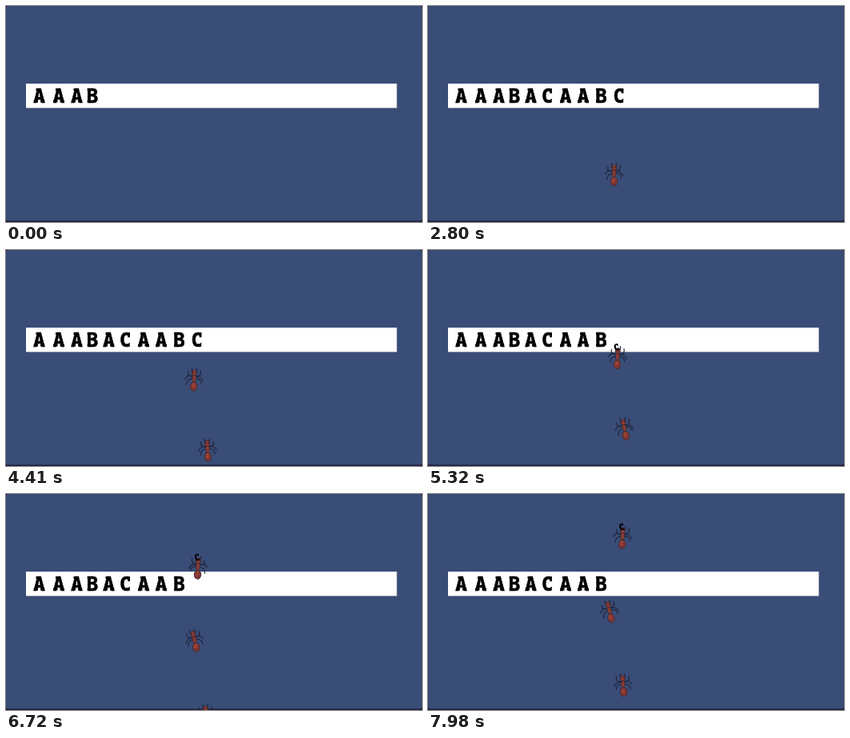
Animation of 520x270 px, one loop 8 s. Source, as an HTML page with a canvas:

```html
<!DOCTYPE html>
<html lang="en">
<head>
<meta charset="utf-8">
<title>Ants and letters</title>
<style>
  html, body { margin: 0; width: 100%; height: 100%; overflow: hidden; background: #394d77; }
  canvas { display: block; }
</style>
</head>
<body>
<canvas id="stage" width="520" height="270"></canvas>
<script>
const ctx = document.getElementById('stage').getContext('2d');
const LOOP = 8000, STEP = 70;
const TEXT = 'AAABACAABC';
const CENTERS = [41.5, 66, 88.5, 108, 128.5, 149, 172, 194, 216.5, 238.5];
const BASELINE = 120.5;
const INITIAL = 4, TYPE_START = 70, TYPE_EVERY = 410;
const PICKUP = 5250;

// Slab serifs as [x, y, width, height], relative to the middle of the baseline.
const SLABS = {
  A: [[-6.7, -3, 5.2, 3], [1.5, -3, 5.2, 3], [-4, -17.5, 6, 3]],
  B: [[-6.3, -3, 4, 3], [-6.3, -17.5, 4, 3]],
  C: [[3.2, -17.3, 2.6, 6]]
};

// Each path takes seconds since the ant's own reference time.
const ants = [
  { from: 1.33, carrier: true,
    x: s => 231 + 0.9 * s + 0.14 * s * s,
    y: s => 255 - 30.2 * s,
    tilt: s => 0.05 - 0.2 * Math.exp(-Math.max(s, 0)) },
  { from: 4.41,
    x: s => 252 - 7 * s,
    y: s => 250 - 28.9 * s,
    tilt: s => -0.23 + 0.18 * Math.exp(-2 * Math.max(s, 0)) },
  { from: 6.72,
    x: s => 250 - 4.8 * s,
    y: s => 277 - 30.2 * s,
    tilt: () => -0.08 }
];

function ellipse(x, y, rx, ry, fill) {
  ctx.beginPath();
  ctx.ellipse(x, y, rx, ry, 0, 0, Math.PI * 2);
  ctx.fillStyle = fill;
  ctx.fill();
}

function curve(x1, y1, bendX, bendY, x2, y2) {
  ctx.beginPath();
  ctx.moveTo(x1, y1);
  ctx.quadraticCurveTo(bendX, bendY, x2, y2);
  ctx.stroke();
}

function letter(char, x, y, scale = 1) {
  ctx.save();
  ctx.translate(x, y);
  ctx.scale(scale, scale);
  ctx.font = 'bold 24px "DejaVu Sans Mono", monospace';
  ctx.textAlign = 'center';
  ctx.fillStyle = ctx.strokeStyle = '#000';
  ctx.lineWidth = 0.6;
  ctx.fillText(char, 0, 0);
  ctx.strokeText(char, 0, 0);
  for (const slab of SLABS[char]) ctx.fillRect(...slab);
  ctx.restore();
}

function drawLegs(s) {
  ctx.strokeStyle = '#20233a';
  ctx.lineWidth = 1.1;
  for (const side of [-1, 1]) {
    const swing = side * Math.sin(s * 12);
    curve(side, -4, side * 10, -4 + swing, side * 7.5, -11 + swing);
    curve(side, -3, side * 8, -7 - swing, side * 11.5, 1 - swing);
    curve(side, -1, side * 9, -2 + swing, side * 9, 6 + swing);
    curve(side, -10, side * 5, -11, side * 2.5, -14.5);
  }
}

function drawBody() {
  const shell = '#8c3b34', edge = '#3b2932';
  ellipse(0, 8.6, 4.7, 5.9, edge);
  ellipse(0, 8.6, 3.9, 5.1, shell);
  ellipse(-0.8, 7.5, 1.7, 2.2, '#ad4a3e');
  ctx.strokeStyle = '#622c30';
  ctx.lineWidth = 0.7;
  for (const y of [7, 10, 12]) curve(-3, y, 0, y + 1.2, 3, y);
  ellipse(0, -1.5, 2.7, 4.8, edge);
  ellipse(0, -1.5, 1.9, 4.2, shell);
  ellipse(0, -8.5, 3.5, 3.8, edge);
  ellipse(0, -8.5, 2.7, 3, shell);
  for (const x of [-1.8, 1.8]) ellipse(x, -9, 0.7, 0.9, '#211c2b');
}

function drawAnt(ant, time) {
  const s = time / 1000 - ant.from;
  const y = ant.y(s);
  if (y > 286) return;
  ctx.save();
  ctx.translate(ant.x(s), y);
  ctx.rotate(ant.tilt(s));
  drawLegs(s);
  drawBody();
  if (ant.carrier && time >= PICKUP) {
    ctx.translate(-2, -13);
    ctx.rotate(-0.3);
    letter('C', 0, 4, 0.45);
  }
  ctx.restore();
}

function drawBoard(time) {
  ctx.fillStyle = '#211a35';
  ctx.fillRect(0, 0, 520, 270);
  ctx.fillStyle = '#394d77';
  ctx.beginPath();
  ctx.roundRect(0, 0, 520, 268.6, 3);
  ctx.fill();
  ctx.fillStyle = '#6c7280';
  ctx.fillRect(26, 98, 463, 30);
  ctx.fillStyle = '#fff';
  ctx.fillRect(25, 97, 463.4, 30.3);

  const typed = INITIAL + Math.max(0, Math.floor((time - TYPE_START) / TYPE_EVERY) + 1);
  const available = time >= PICKUP ? TEXT.length - 1 : TEXT.length;
  const count = Math.min(typed, available);
  for (let i = 0; i < count; i++) letter(TEXT[i], CENTERS[i], BASELINE);
}

let start;
function frame(now) {
  start ??= now;
  const time = Math.floor(((now - start) % LOOP) / STEP) * STEP;
  drawBoard(time);
  for (const ant of ants) drawAnt(ant, time);
  requestAnimationFrame(frame);
}
requestAnimationFrame(frame);
</script>
</body>
</html>
```
